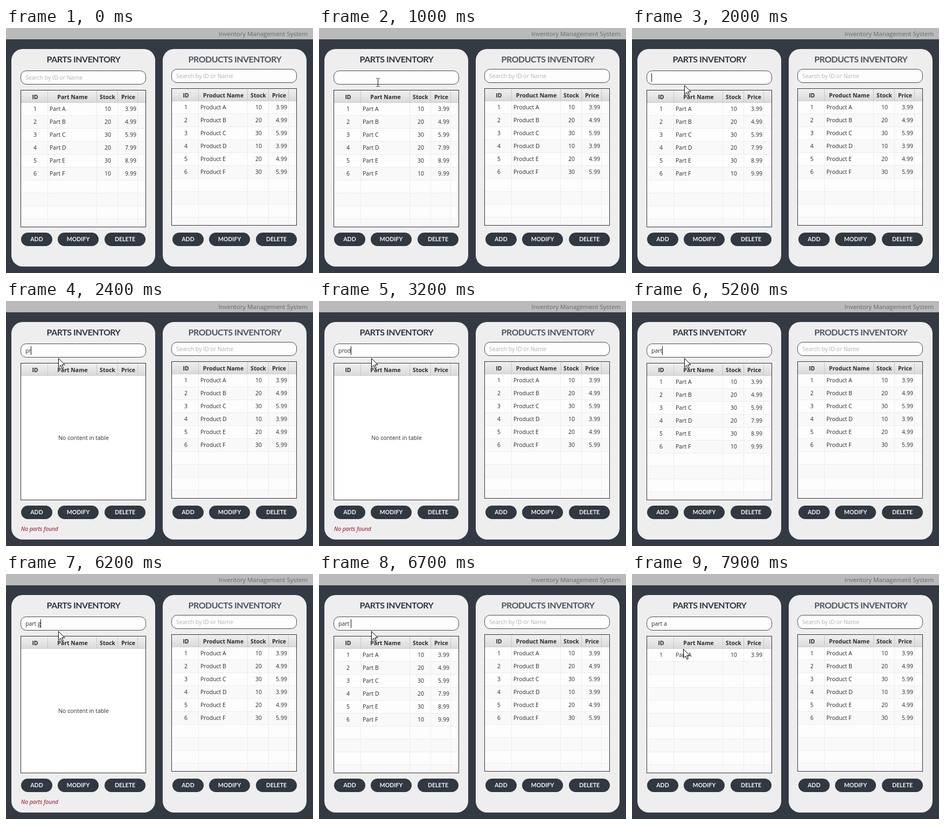
These frames come from a looping animation (570 by 455 pixels, 8 s). An HTML page:

```html
<!DOCTYPE html>
<html lang="en">
<head>
<meta charset="utf-8">
<title>Inventory</title>
<style>
  html, body { margin: 0; width: 100%; height: 100%; overflow: hidden; background: #343a44; }
  svg { display: block; }
  text { font: 10.5px "Open Sans", "Noto Sans", sans-serif; fill: #2b2b2b; white-space: pre; }
  .mid { text-anchor: middle; }
  .head { font-weight: 700; }
  .title { font: 700 16px Lato, sans-serif; letter-spacing: -0.5px; fill: #2f3640; }
  .soft { fill: #4d5460; }
  .label { font: 700 10.6px Lato, sans-serif; fill: #f4f4f4; }
  .bar { font-size: 11.4px; fill: #676767; text-anchor: end; }
  .hint { fill: #b2b2b2; }
  .error { font-size: 10.3px; font-style: italic; fill: #98001c; }
</style>
</head>
<body>
<svg id="stage" width="570" height="455" viewBox="0 0 570 455">
  <defs>
    <linearGradient id="headFill" x2="0" y2="1">
      <stop offset="0" stop-color="#f0f0f0"/>
      <stop offset="1" stop-color="#d9d9d9"/>
    </linearGradient>
  </defs>
  <rect width="570" height="455" fill="#343a44"/>
  <rect width="570" height="21" fill="#bababa"/>
  <text class="bar" x="560" y="15">Inventory Management System</text>
</svg>
<script>
const LOOP = 8000, STEP = 100;
const NS = "http://www.w3.org/2000/svg";
const stage = document.getElementById("stage");

function add(parent, tag, attrs = {}, content = "") {
  const el = document.createElementNS(NS, tag);
  for (const key in attrs) el.setAttribute(key, attrs[key]);
  el.textContent = content;
  parent.appendChild(el);
  return el;
}
const group = (parent, x = 0, y = 0) => add(parent, "g", { transform: `translate(${x} ${y})` });
const rect = (parent, x, y, width, height, fill, more) =>
  add(parent, "rect", { x, y, width, height, fill, ...more });
const label = (parent, x, y, content, cls = "") =>
  add(parent, "text", { x, y, class: cls }, content);
const show = (el, on) => el.setAttribute("visibility", on ? "inherit" : "hidden");

function makeItems(kind, stock, prices) {
  return stock.map((count, i) => ({
    id: i + 1, name: `${kind} ${"ABCDEF"[i]}`, count, price: prices[i].toFixed(2)
  }));
}

const COLUMNS = [77, 168, 207, 244];

function drawTable(parent, kind, items) {
  rect(parent, 28, 116, 231, 253, "#fff");
  const grid = group(parent);
  for (let i = 0; i < 10; i++) {
    const y = 139 + i * 24, h = Math.min(24, 369 - y);
    rect(grid, 28, y, 231, h, i % 2 ? "#f9f9f9" : "#fdfdfd");
    if (h === 24) rect(grid, 28, y + 23, 231, 1, "#ececec");
  }
  for (const x of COLUMNS) rect(grid, x, 139, 1, 230, "#ececec");

  rect(parent, 28, 116, 231, 23, "url(#headFill)");
  rect(parent, 28, 138, 231, 1, "#cfcfcf");
  for (const x of COLUMNS) rect(parent, x, 117, 1, 21, "#c6c6c6");
  [["ID", 54], [`${kind} Name`, 123.5], ["Stock", 188.5], ["Price", 227]]
    .forEach(([content, x]) => label(parent, x, 132, content, "mid head"));

  const rows = items.map((item, i) => {
    const row = group(parent), y = 154 + i * 24;
    label(row, 54, y, item.id, "mid");
    label(row, 81, y, item.name);
    label(row, 189, y, item.count, "mid");
    label(row, 231.5, y, item.price, "mid");
    return row;
  });
  const empty = label(parent, 144, 258, "No content in table", "mid");
  show(empty, false);
  rect(parent, 27.5, 115.5, 232, 254, "none", { stroke: "#30303c" });
  return { grid, rows, empty };
}

function drawPanel(x, shift, title, titleClass, kind, items) {
  rect(stage, x, 39, 267, 404, "#eeeeee", { rx: 21 });
  label(stage, x + 134, 64, title, `mid title ${titleClass}`);
  const body = group(stage, ...shift);
  rect(body, 27.5, 79.5, 232, 25, "#fdfdfd", { rx: 10, stroke: "#45474f" });
  const hint = label(body, 36, 96, "Search by ID or Name", "hint");
  const table = drawTable(body, kind, items);
  [["ADD", 18, 58], ["MODIFY", 86, 76], ["DELETE", 173, 76]].forEach(([content, dx, w]) => {
    rect(stage, x + dx, 380, w, 25, "#303841", { rx: 12.5 });
    label(stage, x + dx + w / 2, 396, content, "mid label");
  });
  return { hint, ...table };
}

const partItems = makeItems("Part", [10, 20, 30, 20, 30, 10], [3.99, 4.99, 5.99, 7.99, 8.99, 9.99]);
const productItems = makeItems("Product", [10, 20, 30, 10, 20, 30], [3.99, 4.99, 5.99, 3.99, 4.99, 5.99]);
const parts = drawPanel(10, [0, 0], "PARTS INVENTORY", "", "Part", partItems);
drawPanel(291, [280, -3], "PRODUCTS INVENTORY", "soft", "Product", productItems);

const query = label(stage, 36, 96, "");
const caret = rect(stage, 36, 84, 1, 16, "#111");
const error = label(stage, 28, 427, "No parts found", "error");
const arrow = add(stage, "path", {
  d: "M.5 .5V17L4.3 13.4L7 19.6L9.4 18.6L6.8 12.5H12Z", fill: "#fff", stroke: "#000"
});
const beam = add(stage, "path", {
  d: "M-3 -7.5H-1L0 -6.5L1 -7.5H3M0 -6.5V6.5M-3 7.5H-1L0 6.5L1 7.5H3",
  fill: "none", stroke: "#111"
});

// Search text by time; each entry also restarts the caret blink.
const FOCUS = 1000;
const TYPING = [
  [FOCUS, ""], [2400, "pr"], [3100, "pro"], [3200, "prod"], [4100, "pro"], [4200, "pr"],
  [4300, "p"], [4800, "pa"], [4900, "par"], [5200, "part"], [6000, "part "],
  [6200, "part g"], [6600, "part "], [6700, "part "], [7400, "part a"]
];

function pointerAt(t) {
  if (t >= 7900) return [95, 139];
  if (t >= 1300) return [97, 106];
  const from = t < FOCUS ? [524, 161] : [109, 101];
  const to = t < FOCUS ? [109, 101] : [97, 106];
  const p = t < FOCUS ? (t - 200) / 800 : (t - FOCUS) / 300;
  const eased = t < FOCUS ? 1 - (1 - p) ** 2 : p;
  return from.map((v, i) => Math.round(v + (to[i] - v) * eased));
}

function drawPointer(t) {
  const [x, y] = pointerAt(t);
  const inField = x > 27 && x < 260 && y > 79 && y < 105;
  show(arrow, t >= 200 && !inField);
  show(beam, t >= 200 && inField);
  arrow.setAttribute("transform", `translate(${x} ${y})`);
  beam.setAttribute("transform", `translate(${x + 0.5} ${y})`);
}

function render(t) {
  const focused = t >= FOCUS;
  const [since, typed] = TYPING.filter(([start]) => start <= t).pop() || [0, ""];
  const matches = partItems.map(item => item.name.toLowerCase().includes(typed));
  const found = matches.includes(true);

  show(parts.hint, !focused);
  parts.rows.forEach((row, i) => show(row, matches[i]));
  show(parts.grid, found);
  show(parts.empty, !found);
  show(error, !found);

  query.textContent = typed;
  caret.setAttribute("x", 36 + Math.floor(typed ? query.getComputedTextLength() : 0));
  show(caret, t > FOCUS && (t - since) % 1000 < 500);
  drawPointer(t);
}

const begin = performance.now();
function tick() {
  const t = (performance.now() - begin) % LOOP;
  render(Math.floor(t / STEP) * STEP);
  requestAnimationFrame(tick);
}
tick();
</script>
</body>
</html>
```
